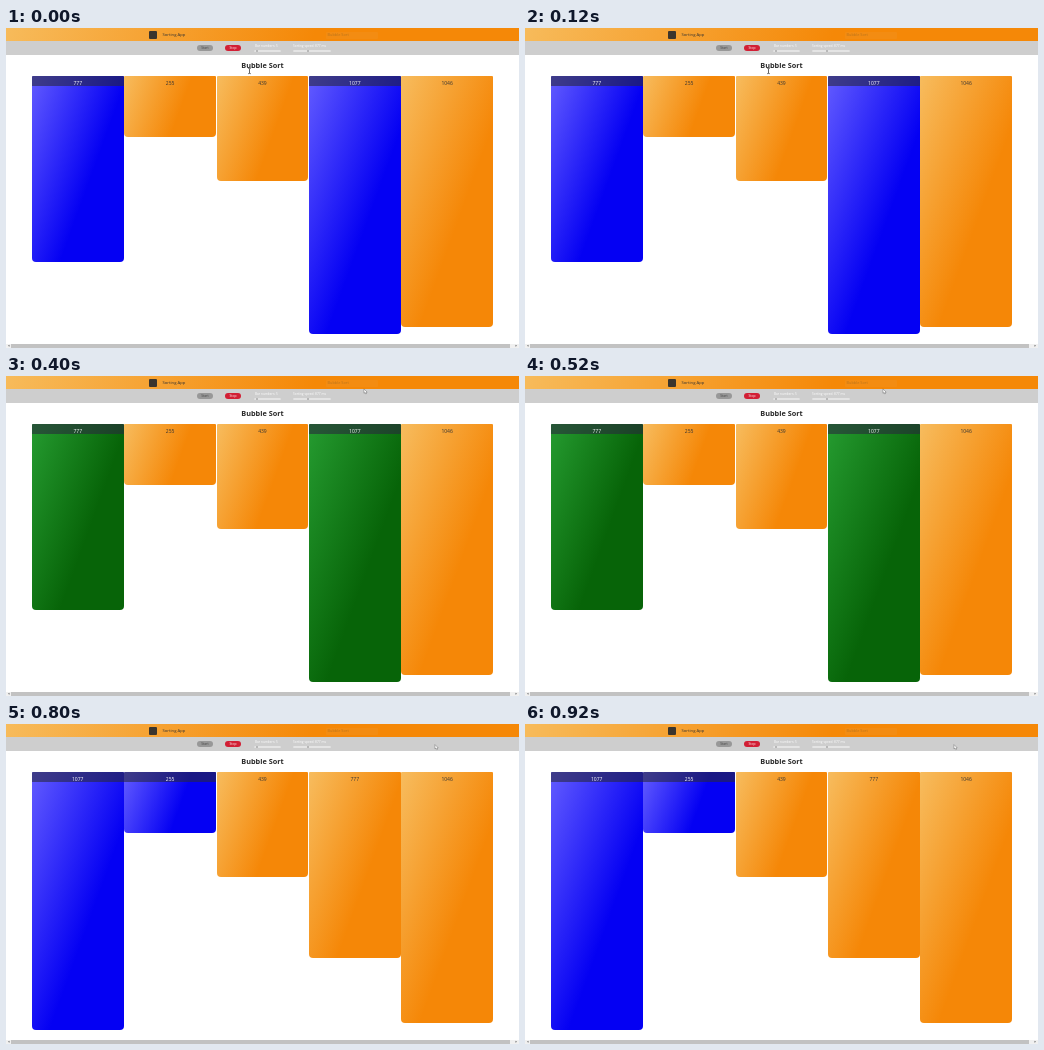
Recreate the animation shown at these times as an HTML page. Size 513x320 px, loop 1 s.

```html
<!DOCTYPE html>
<html lang="en">
<head>
<meta charset="utf-8">
<title>Sorting App</title>
<style>
html, body { margin: 0; width: 100%; height: 100%; overflow: hidden; background: #fff; }
body { position: relative; font: 5px "Open Sans", "Noto Sans", sans-serif; color: #333; }
body * { position: absolute; box-sizing: border-box; white-space: nowrap; }
#nav { left: 0; top: 0; width: 513px; height: 13.4px; background: linear-gradient(110deg, #f7bb5b, #f58807 60%); }
#logo { left: 143px; top: 3px; width: 8px; height: 8px; border-radius: 1px; background: #3b352d; }
#name { left: 156.5px; top: 4px; font-size: 4.2px; line-height: 6px; }
#pick { left: 320px; top: 3.5px; width: 52px; height: 7px; padding-left: 1.5px; border-radius: 1px;
  background: #f1921e80; color: #b9741d; font-size: 3.9px; line-height: 6.6px; }
#tools { left: 0; top: 13.4px; width: 513px; height: 13.2px; background: #cecece; }
.btn { top: 3.6px; width: 16.5px; height: 6.2px; border-radius: 3px; text-align: center; font-size: 3.3px; line-height: 6px; }
.label { top: 3px; color: #fff; font-size: 3.2px; line-height: 5px; }
.slider { top: 8.2px; height: 2.6px; border-radius: 1px; background: #f6f6f6; border: .5px solid #e4e4e4; }
.slider i { top: -.2px; width: 2px; height: 2px; border-radius: 1px; background: #aaa; }
h1 { left: 0; top: 32px; width: 513px; margin: 0; text-align: center; font-size: 7.3px; line-height: 11px; color: #2b2b2b; }
.bar { top: 47.7px; width: 91.9px; border-radius: 1px 1px 4px 4px; overflow: hidden; }
.bar b { left: 0; top: 0; width: 100%; height: 10.6px; padding-top: 2.1px; text-align: center; font-weight: 400; line-height: 10.6px; }
.bar b span { left: 0; top: 2.2px; width: 100%; }
.on b { background: #28283c99; color: #fff; }
#scroll { left: 0; top: 315.6px; width: 513px; height: 4.4px; background: #f0f0f0; }
#thumb { left: 5px; top: .6px; width: 499px; height: 3.4px; background: #c2c2c2; }
svg { left: 0; top: 0; }
</style>
</head>
<body>
<div id="nav"><div id="logo"></div><div id="name">Sorting App</div><div id="pick">Bubble Sort</div></div>
<div id="tools">
  <div class="btn" style="left:190.7px;background:#989898;color:#444">Start</div>
  <div class="btn" style="left:218.7px;background:#d21f35;color:#fff">Stop</div>
  <div class="label" style="left:249px">Bar numbers: 5</div>
  <div class="slider" style="left:248px;width:27px"><i style="left:1px"></i></div>
  <div class="label" style="left:287px">Sorting speed: 877 ms</div>
  <div class="slider" style="left:287px;width:38px"><i style="left:13px"></i></div>
</div>
<h1>Bubble Sort</h1>
<div id="bars"></div>
<div id="scroll"><div id="thumb"></div></div>
<svg width="513" height="320">
  <path d="M3.5 316.8v2l-1.5-1zM509.5 316.8v2l1.5-1z" fill="#666"/>
  <g id="cursor">
    <path id="beam" d="M-1.2-2.7Q0-2.7 0-2Q0-2.7 1.2-2.7M0-2V2M-1.2 2.7Q0 2.7 0 2Q0 2.7 1.2 2.7" fill="none" stroke="#222" stroke-width=".7"/>
    <path id="arrow" d="M-1-2.4V2L0 1.2L.8 2.7L1.5 2.3L.9 .9H2.2Z" fill="#fff" stroke="#555" stroke-width=".4"/>
  </g>
</svg>
<script>
const $ = id => document.getElementById(id);
const fills = {
  idle: ['#f7bc5e', '#f58707'],
  compare: ['#625bff', '#0400f3'],
  swap: ['#259b30', '#076408']
};
const before = [777, 255, 439, 1077, 1046];
const after = [1077, 255, 439, 777, 1046];
const steps = [
  { values: before, pair: [0, 3], mode: 'compare', mouse: [243.5, 43], beam: true },
  { values: before, pair: [0, 3], mode: 'swap', mouse: [241, 42.5], beam: true },
  { values: before, pair: [0, 3], mode: 'swap', mouse: [359, 15.3] },
  { values: after, pair: [0, 4], mode: 'compare', mouse: [382, 22.3] },
  { values: after, pair: [0, 1], mode: 'compare', mouse: [430, 23] }
];

const bars = before.map((_, i) => {
  const bar = document.createElement('div');
  bar.innerHTML = '<b><span></span></b>';
  bar.style.left = 25.8 + 92.35 * i + 'px';
  $('bars').append(bar);
  return bar;
});

function show({ values, pair, mode, mouse, beam }) {
  bars.forEach((bar, i) => {
    const on = pair.includes(i);
    const [light, deep] = fills[on ? mode : 'idle'];
    bar.className = on ? 'bar on' : 'bar';
    bar.style.height = values[i] * 0.24 + 'px';
    bar.style.background = `linear-gradient(110deg, ${light}, ${deep} 60%)`;
    bar.querySelector('span').textContent = values[i];
  });
  $('cursor').setAttribute('transform', `translate(${mouse})`);
  $('beam').style.display = beam ? '' : 'none';
  $('arrow').style.display = beam ? 'none' : '';
}

let last = -1;
const start = performance.now();
function tick() {
  const step = Math.floor((performance.now() - start) % 1000 / 200);
  if (step !== last) show(steps[last = step]);
  requestAnimationFrame(tick);
}
tick();
</script>
</body>
</html>
```
